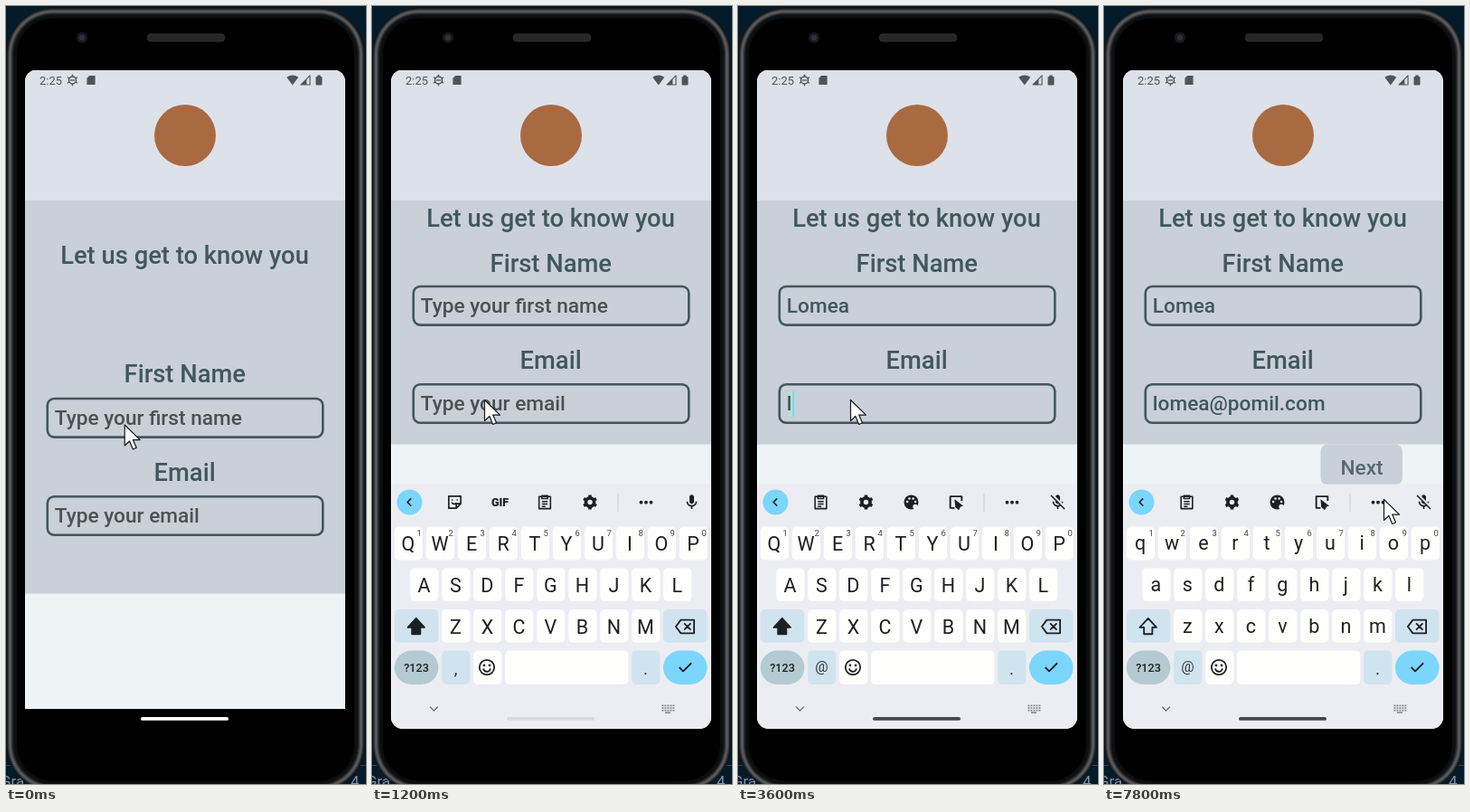
Animation of 398x860 px, one loop 8 s. Source, as an HTML page with a canvas:

```html
<!DOCTYPE html>
<html lang="en">
<head>
<meta charset="utf-8">
<title>Sign-up form</title>
<style>
  html, body { margin: 0; width: 100%; height: 100%; overflow: hidden; background: #031b2b; }
  canvas { display: block; width: 398px; height: 860px; }
</style>
</head>
<body>
<canvas id="stage"></canvas>
<script>
const W = 398, H = 860, LOOP = 8000, TICK = 200;
const canvas = document.getElementById('stage');
const c = canvas.getContext('2d');
const ratio = window.devicePixelRatio || 1;
canvas.width = W * ratio;
canvas.height = H * ratio;

const INK = '#41575d', PANEL = '#c9d0d7', KEY_INK = '#1d2022', STATUS = '#505458';
const KEY = '#fefefc', SOFT = '#d0e4ef', BLUE = '#7bd6fc', BOARD = '#ecedf2';
const HEAD = 27.35, BODY = 22.65;
const NAME = 'Lomea', MAIL = 'lomea@pomil.com';

// Times at which the typed length reaches each value.
const nameKeys = [1400, 1600, 1800, 2000, 2200];
const mailKeys = [3600, 4200, 4200, 4400, 4600, 5200, 5400, 5600, 5800, 5800, 6000, 6200, 6400, 6600, 6800];
const caretGaps = [[600, 1000], [1200, 1400], [2400, 2600], [3400, 3600], [7200, 8000]];
const typed = (text, keys, t) => text.slice(0, keys.filter(k => t >= k).length);

function box(x, y, w, h, r, fill, stroke, lw = 1) {
  c.beginPath();
  c.roundRect(x, y, w, h, r);
  if (fill) { c.fillStyle = fill; c.fill(); }
  if (stroke) { c.strokeStyle = stroke; c.lineWidth = lw; c.stroke(); }
}

function disc(x, y, r, fill, stroke, lw = 1) {
  c.beginPath();
  c.arc(x, y, r, 0, 7);
  if (fill) { c.fillStyle = fill; c.fill(); }
  if (stroke) { c.strokeStyle = stroke; c.lineWidth = lw; c.stroke(); }
}

function text(s, x, y, size, color = INK, align = 'center', weight = 500) {
  c.font = `${weight} ${size}px Roboto, sans-serif`;
  c.textAlign = align;
  c.fillStyle = color;
  c.fillText(s, x, y);
}

// Draws a path given on a 24-unit grid, centred on x, y.
function icon(d, x, y, size, fill, stroke, lw = 2) {
  const p = new Path2D(d);
  c.save();
  c.translate(x - size / 2, y - size / 2);
  c.scale(size / 24, size / 24);
  if (fill) { c.fillStyle = fill; c.fill(p, 'evenodd'); }
  if (stroke) {
    c.strokeStyle = stroke;
    c.lineWidth = lw;
    c.lineJoin = 'round';
    c.stroke(p);
  }
  c.restore();
}

const MIC = 'M12 14c1.7 0 3-1.3 3-3V5c0-1.7-1.3-3-3-3S9 3.3 9 5v6c0 1.7 1.3 3 3 3z' +
  'M17 11c0 2.8-2.2 5-5 5s-5-2.2-5-5H5c0 3.5 2.6 6.4 6 6.9V21h2v-3.1c3.4-.5 6-3.4 6-6.9z';
const CLIP = 'M4 4H20V21H4ZM8 3H16V7H8ZM8 11H16M8 14.5H16M8 18H13';
const STICKER = 'M4 4H20V14L14 20H4ZM20 14H14V20M8 9H9.5M14.5 9H16M8 12.5Q11 16 14 13';
const NOTE = 'M20 10V4H4V20H10';
const HAND = 'M10 8L22 17L18 18.5L16 23L11 19Z';
const SHIFT = 'M12 2L22 13H17V21H7V13H2Z';
const ERASE = 'M7 4H23V20H7L1 12ZM11 8L19 16M19 8L11 16';

function spokes(x, y, n, from, to, color, lw) {
  c.strokeStyle = color;
  c.lineWidth = lw;
  c.beginPath();
  for (let i = 0; i < n; i++) {
    const a = (i + .5) * 2 * Math.PI / n;
    c.moveTo(x + from * Math.cos(a), y + from * Math.sin(a));
    c.lineTo(x + to * Math.cos(a), y + to * Math.sin(a));
  }
  c.stroke();
}

function gear(x, y, r, color) {
  disc(x, y, r * .62, null, color, r * .5);
  spokes(x, y, 6, r * .75, r * 1.08, color, r * .48);
}

function palette(x, y) {
  disc(x, y, 8, KEY_INK);
  for (const [dx, dy] of [[-4.4, -.5], [-2, -4], [2.2, -4], [4.6, -.5]]) disc(x + dx, y + dy, 1.3, BOARD);
  disc(x + 4.6, y + 5, 2.8, BOARD);
}

function phone() {
  c.fillStyle = '#031b2b';
  c.fillRect(0, 0, W, H);
  c.fillStyle = '#35434d';
  c.fillRect(0, 839, W, 1);
  text('Gra', -6, 863, 17, '#8493a0', 'left', 400);
  text('4', 381, 863, 17, '#8493a0', 'left', 400);
  // Rounded metal edge: brightest a few pixels in, fading to black.
  for (let i = 0; i < 13; i++) {
    const g = Math.round(12 + 80 * Math.exp(-(((i - 4) / 2.4) ** 2)));
    box(i, 1.5 + i, W - 1 - 2 * i, 867 - 2 * i, 52 - i, i < 12 ? `rgb(${g},${g + 2},${g + 4})` : '#000');
  }
  disc(84, 35, 6, '#17191d');
  disc(84, 35, 3.2, '#2c3140');
  box(156.5, 31, 85, 8, 3, '#262626', '#313131');
}

function statusBar() {
  text('2:25', 37, 86.5, 13, STATUS, 'left', 400);
  disc(73.5, 82, 4, null, STATUS, 1.5);
  spokes(73.5, 82, 6, 4, 6.3, STATUS, 1.4);
  c.fillStyle = STATUS;
  c.fillRect(71, 81.4, 5, 1.3);
  icon('M8 1H22V23H2V7Z', 94, 82, 11, STATUS);
  icon('M0 5Q12 -3 24 5L12 21Z', 316.8, 82.5, 13, STATUS);
  icon('M1 23L23 1V23Z', 331, 82, 11, null, STATUS, 2.5);
  icon('M1 23L15 9V23Z', 331, 82, 11, STATUS);
  box(342.5, 78, 7, 9.5, 1, STATUS);
  c.fillStyle = STATUS;
  c.fillRect(344.3, 76.5, 3.4, 2);
}

function caret(x, y) {
  c.fillStyle = 'rgba(172,232,222,.75)';
  c.fillRect(x - 1, y, 4, 28);
  c.fillStyle = '#78dee2';
  c.fillRect(x, y, 2, 28);
}

function field(y, value, hint, focused, t) {
  box(45.8, y, 304.5, 42.6, 7.5, null, INK, 2.6);
  text(value || hint, 53.8, y + 28.8, BODY, value ? INK : '#4b5053', 'left');
  const shown = !caretGaps.some(([a, b]) => t >= a && t < b);
  if (focused && shown) caret(54.5 + (value ? c.measureText(value).width : 0), y + 7.8);
}

function form(t) {
  const open = t >= 200, shift = open ? 124 : 0;
  const name = typed(NAME, nameKeys, t), mail = typed(MAIL, mailKeys, t);
  c.fillStyle = '#eef3f6';
  c.fillRect(21, 71, 354, open ? 728 : 706);
  c.fillStyle = '#dde1e9';
  c.fillRect(21, 71, 354, 144);
  c.fillStyle = PANEL;
  c.fillRect(21, 215, 354, open ? 269.5 : 434.5);
  statusBar();
  disc(198, 143, 34, '#a96a42');

  text('Let us get to know you', 197.5, open ? 243.8 : 285, HEAD);
  text('First Name', 197.8, open ? 293.5 : 416.4, HEAD);
  text('Email', 197.6, 525 - shift, HEAD);
  const onName = open && t < 3000;
  field(434 - shift, name, 'Type your first name', onName, t);
  field(542.2 - shift, mail, 'Type your email', t >= 3000, t);

  if (onName && name.length > 1) {
    const part = t < 2400 ? name.slice(0, -1) : name;
    c.fillStyle = INK;
    c.fillRect(54, 341, c.measureText(part).width, 1.3);
  }
  if (t >= 7000) {
    c.globalAlpha = Math.min(1, .5 + (t - 7000) / 400 * .5);
    box(239.5, 484.5, 90.5, 45, 8, PANEL);
    text('Next', 285, 517.8, BODY, '#56686f');
    c.globalAlpha = 1;
  }
}

function toolbar(mail) {
  disc(41.5, 548.5, 14, BLUE);
  icon('M15 5L8 12L15 19', 41.5, 548.5, 14, null, KEY_INK, 2.8);
  if (mail) {
    icon(CLIP, 91.5, 548.5, 19, null, KEY_INK);
    gear(141.5, 548.5, 7.4, KEY_INK);
    palette(191.5, 548.5);
    icon(NOTE, 241, 548.5, 19, null, KEY_INK, 2.4);
    icon(HAND, 241, 548.5, 19, KEY_INK);
  } else {
    icon(STICKER, 91.5, 548.5, 20, null, KEY_INK);
    text('GIF', 141.5, 553, 12.5, KEY_INK, 'center', 900);
    icon(CLIP, 191, 548.5, 19, null, KEY_INK);
    gear(241, 548.5, 7.4, KEY_INK);
  }
  c.fillStyle = '#cbced3';
  c.fillRect(271.5, 539, 1, 20);
  for (const x of [297.5, 303, 308.5]) disc(x, 548.7, 1.9, KEY_INK);
  icon(MIC, 353.5, 548.5, 20, KEY_INK);
  if (mail) {
    icon('M3 3L21 21', 354.5, 547.5, 20, null, BOARD, 3);
    icon('M3 3L21 21', 353.5, 548.5, 20, null, KEY_INK, 2);
  }
}

function row(letters, x, y, upper, digits) {
  [...letters].forEach((ch, i) => {
    const left = x + i * 35;
    box(left, y, 31.2, 36.8, 5, KEY);
    text(upper ? ch.toUpperCase() : ch, left + 15.2, y + (upper ? 26.8 : 25.6), 21.5, KEY_INK, 'center', 400);
    if (digits) text((i + 1) % 10, left + 27.3, y + 10.3, 9.5, '#44484b', 'center', 400);
  });
}

function keyboard(t) {
  const upper = t < 1400 || (t >= 3200 && t < 4200), mail = t >= 3200;
  c.fillStyle = BOARD;
  c.fillRect(21, 528.5, 354, 271);
  toolbar(mail);
  row('qwertyuiop', 24.8, 575.6, upper, true);
  row('asdfghjkl', 42.2, 621.3, upper);
  row('zxcvbnm', 77.2, 667, upper);
  box(24.8, 667, 48.6, 36.8, 5, SOFT);
  icon(SHIFT, 48.8, 686, 22, upper ? KEY_INK : null, KEY_INK, 2);
  box(322, 667, 48.6, 36.8, 5, SOFT);
  icon(ERASE, 346, 686, 22, null, KEY_INK, 2);

  box(24.8, 712.6, 48.6, 37.4, 18.7, '#b4cad2');
  text('?123', 49, 736, 12.6, KEY_INK, 'center', 500);
  box(77.2, 712.6, 31.2, 37.4, 5, SOFT);
  text(mail ? '@' : ',', 92.5, mail ? 736 : 738.5, mail ? 16 : 19, '#34393c', 'center', 400);
  box(112.2, 712.6, 31.2, 37.4, 5, KEY);
  disc(127, 731, 8.2, null, KEY_INK, 1.8);
  disc(124, 728.8, 1.4, KEY_INK);
  disc(130, 728.8, 1.4, KEY_INK);
  c.beginPath();
  c.arc(127, 731.8, 4, .15, Math.PI - .15);
  c.stroke();
  box(147, 712.6, 136.4, 37.4, 5, KEY);
  box(287.2, 712.6, 31.2, 37.4, 5, SOFT);
  text('.', 302.6, 738.5, 19, KEY_INK, 'center', 400);
  box(322, 712.6, 48.6, 37.4, 18.7, BLUE);
  icon('M4 12L9.5 17.5L21 6', 346, 731, 19, null, KEY_INK, 2.3);

  icon('M5 9L12 16L19 9', 68.5, 776.5, 15, null, '#666b70', 2);
  c.fillStyle = '#777b80';
  for (let i = 0; i < 15; i++) c.fillRect(320.5 + i % 5 * 3, 772.5 + Math.floor(i / 5) * 2.7, 1.8, 1.6);
  c.fillRect(324, 780.4, 6, 1.4);
}

function pointerAt(t) {
  if (t < 200) return [131, 462.5];
  if (t < 400) return [127, 449];
  if (t < 1000) return [122.3, 435];
  if (t < 7600) return [124.3, 435];
  if (t < 7800) return [226, 496];
  return [309.3, 545];
}

function pointer(t) {
  const [x, y] = pointerAt(t);
  icon('M0 0V23L5.4 18L9.2 27L13 25.3L9.2 16.6H17Z', x + 12.2, y + 12.5, 24, '#fff', '#17191b', 1.2);
}

function draw(now) {
  const t = Math.floor(now % LOOP / TICK) * TICK;
  c.setTransform(ratio, 0, 0, ratio, 0, 0);
  phone();
  c.save();
  c.beginPath();
  c.roundRect(21, 70.5, 354, 728.5, 13);
  c.clip();
  // The screen stays black below the form until the keyboard opens.
  c.fillStyle = '#000';
  c.fillRect(21, 70, 354, 730);
  form(t);
  if (t >= 200) {
    c.save();
    if (t < 400) c.translate(0, 60);
    keyboard(t);
    c.restore();
  }
  c.restore();
  const bar = t < 200 ? '#fff' : t < 1400 ? '#d8d9de' : '#45474b';
  box(149, 786, 97, 3.8, 1.9, bar);
  pointer(t);
}

const start = performance.now();
function loop() {
  draw(performance.now() - start);
  requestAnimationFrame(loop);
}
loop();
</script>
</body>
</html>
```
